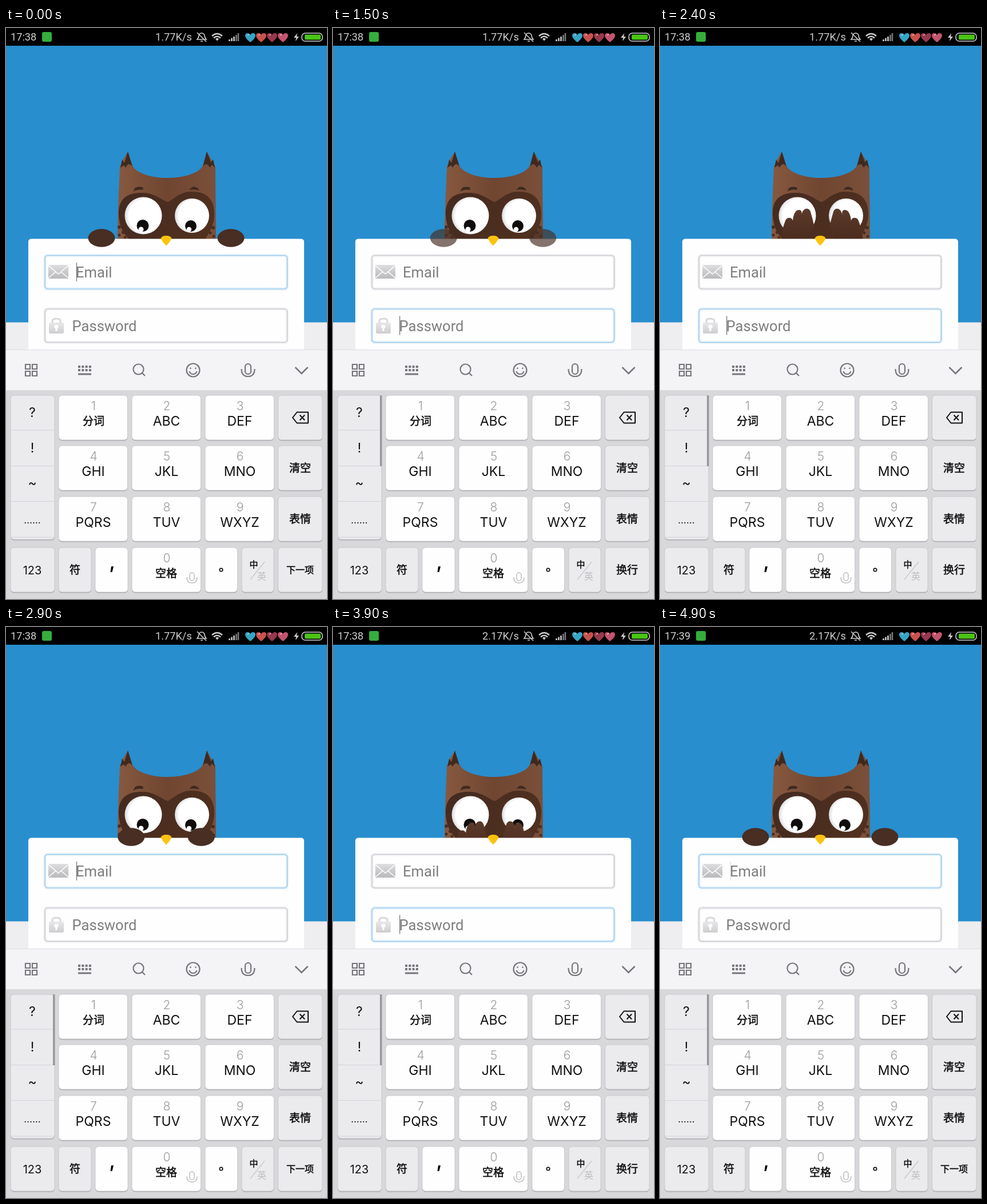
Write an HTML page that moves like this. It is 561x998 px and loops after 5000 ms.

```html
<!DOCTYPE html>
<html lang="en">
<head>
<meta charset="utf-8">
<title>Owl login</title>
<style>
  html, body { margin: 0; width: 100%; height: 100%; overflow: hidden; background: #000; }
  svg { display: block; width: 561px; height: 998px; }
  text { font-family: Inter, "Noto Sans CJK SC", "Noto Sans CJK", sans-serif; }
  .ui { font-family: Roboto, sans-serif; }
  .mid { text-anchor: middle; }
  .han { stroke: #111; stroke-width: .5; }
  .line { fill: none; stroke: #76767a; stroke-width: 2.2; }
</style>
</head>
<body>
<svg viewBox="0 0 561 998">
  <defs>
    <linearGradient id="fur">
      <stop offset="0" stop-color="#87593f"/>
      <stop offset=".5" stop-color="#704631"/>
      <stop offset="1" stop-color="#7b503a"/>
    </linearGradient>
    <linearGradient id="mask" x2="1" y2=".3">
      <stop offset="0" stop-color="#432a20"/>
      <stop offset="1" stop-color="#50301f"/>
    </linearGradient>
    <linearGradient id="wing" x2="0" y2="1">
      <stop offset="0" stop-color="#5b3a2a"/>
      <stop offset=".5" stop-color="#48291d"/>
    </linearGradient>
    <linearGradient id="grey" x2="0" y2="1">
      <stop offset="0" stop-color="#dedee0"/>
      <stop offset="1" stop-color="#b9b9bc"/>
    </linearGradient>
    <radialGradient id="eye" cx=".56" cy=".5" r=".56">
      <stop offset=".8" stop-color="#fff"/>
      <stop offset="1" stop-color="#d9d9dd"/>
    </radialGradient>
    <path id="arm" fill="url(#wing)" d="M211 440V372C212 358 216 345 219 337C221 330 231 330 232 337C233 325 237 318 243 318C247 318 248 321 247.500 326C250 314 260 313 263 321C266 332 269 342 270 350L262 356V440Z"/>
    <path id="heart" d="M0 8C-5 4-9 0-9-4C-9-9-2-9 0-5C2-9 9-9 9-4C9 0 5 4 0 8Z"/>
  </defs>

  <rect width="561" height="998" fill="#eeedef"/>
  <rect y="31" width="561" height="483.500" fill="#288ece"/>

  <!-- status bar -->
  <rect width="561" height="31"/>
  <g font-size="18.200" fill="#cfcfcf">
    <text id="clock" class="ui" x="8" y="22"></text>
    <text id="speed" class="ui" x="261" y="22"></text>
  </g>
  <rect x="63" y="7" width="17" height="17" rx="3" fill="#35ae3c"/>
  <g fill="none" stroke="#cbcbcb" stroke-width="1.6">
    <path d="M334 20Q337 17 337 13Q338 9 342 9Q346 9 347 13Q347 17 350 20ZM340 23H344M334 8L350 24"/>
    <path stroke-width="2.4" d="M360 14Q369 6 378 14M363 17.5Q369 12 375 17.5"/>
    <path stroke-width="2.6" d="M390.5 23V20M394.5 23V17.5M398.500 23V15"/>
    <path stroke="#777" stroke-width="2.6" d="M402.500 23V12M406 23V9"/>
    <rect x="517" y="9" width="36" height="14" rx="6"/>
  </g>
  <path fill="#cbcbcb" d="M366 19Q369 16.500 372 19L369 22.500ZM509 9L503 17H507L506 23L512 15H508Z"/>
  <rect x="522" y="11.500" width="28" height="9" rx="2" fill="#49c512"/>
  <use href="#heart" x="427" y="17" fill="#36a5c6"/>
  <use href="#heart" x="446" y="17" fill="#c8524d"/>
  <use href="#heart" x="465" y="17" fill="#96394f"/>
  <use href="#heart" x="484" y="17" fill="#c3546f"/>
  <path fill="none" stroke="#e9c3c8" stroke-width="1.5" d="M422 13L425 11M441 13L444 11M460 13L463 11M479 13L482 11"/>

  <!-- owl -->
  <path fill="url(#fur)" d="M195 372C195 325 197 290 199 243L204 231L213 216L221 241C238 269 327 269 344 241L351 216L360 232L366 243C366 285 367 330 367 372Z"/>
  <path fill="#3f291f" d="M200 244L203 230L207 236L213 216L221 242Q214 233 209 244L206 240ZM344 242L351 216L358 235L362 230L365 244L360 239L356 244Q351 233 344 242Z"/>
  <path fill="url(#mask)" d="M197 328C195 296 215 287 240 288C262 289 275 303 283 304C292 300 305 285 325 286C352 286 364 300 364 325C364 348 353 359 347 372H218C204 360 198 345 197 328Z"/>
  <path fill="#3f291f" d="M222 286L226 279Q233 276 240 279L239 283Q230 281 222 286ZM320 283L325 278Q334 276 338 284Q329 281 320 283Z"/>
  <g fill="#4a2e22">
    <circle cx="198" cy="348" r="3"/><circle cx="205" cy="357" r="3"/>
    <circle cx="198" cy="362" r="2.500"/><circle cx="208" cy="366" r="2.500"/>
    <circle cx="362" cy="349" r="3"/><circle cx="357" cy="358" r="2.500"/><circle cx="363" cy="364" r="2.500"/>
  </g>
  <circle cx="240" cy="328" r="32.500" fill="url(#eye)"/>
  <circle cx="325" cy="328" r="30" fill="url(#eye)"/>
  <circle cx="239" cy="345.500" r="10.500" fill="#100c0c"/>
  <circle cx="323" cy="346" r="10" fill="#100c0c"/>
  <circle cx="236" cy="352" r="4.500" fill="#fff"/>
  <circle cx="320" cy="352" r="4.200" fill="#fff"/>
  <g id="arms">
    <use href="#arm"/>
    <use href="#arm" transform="matrix(-1 0 0 1 566 0)"/>
  </g>

  <!-- form -->
  <rect x="39" y="368.500" width="482" height="220" rx="5" fill="#fefefe"/>
  <ellipse id="leftHand" cx="167" cy="367" rx="23.500" ry="15.700" fill="#482e23"/>
  <ellipse id="rightHand" cx="393" cy="367" rx="23.500" ry="15.700" fill="#482e23"/>
  <path fill="#fdc20d" d="M270.500 368Q272 363 280 363Q288 363 289.500 368Q286 375 280 380.500Q274 375 270.500 368Z"/>
  <g id="fields"></g>
  <rect x="74" y="414" width="35" height="24" fill="url(#grey)"/>
  <path fill="none" stroke="#fff" stroke-width="1.600" d="M74 415L91.500 430L109 415M74 437L87 426M109 437L96 426"/>
  <path fill="none" stroke="#d9d9db" stroke-width="3" d="M81 516V512Q81 508 88 508Q95 508 95 512V516"/>
  <rect x="75" y="515" width="26" height="19" rx="2" fill="url(#grey)" opacity=".7"/>
  <path fill="#fff" d="M88 519A3 3 0 0 1 89.500 525V530H86.500V525A3 3 0 0 1 88 519Z"/>
  <g font-size="25.600" fill="#7e7e7e">
    <text class="ui" x="122" y="436">Email</text>
    <text class="ui" x="115.500" y="530">Password</text>
  </g>
  <rect id="caret" width="1.300" height="33" fill="#777"/>

  <!-- keyboard -->
  <rect y="562" width="561" height="72" fill="#f4f3f6"/>
  <path stroke="#dddce0" d="M0 562.500H561"/>
  <rect y="633" width="561" height="365" fill="#d8d7da"/>
  <g class="line">
    <path d="M34 588H42V596H34ZM46 588H54V596H46ZM34 600H42V608H34ZM46 600H54V608H46Z"/>
    <path stroke-width="4" stroke-dasharray="4 2.300" d="M126 592H149M126 598H149"/>
    <path stroke-width="3" d="M126 605H149"/>
    <circle cx="231.500" cy="596.500" r="9"/><path d="M238 603L243 608"/>
    <circle cx="327" cy="598" r="11.500"/>
    <path d="M320.500 600Q322 605 327 605Q332 605 333.500 600M322.500 593.500V596M331.500 593.500V596"/>
    <rect x="418" y="587" width="10" height="18" rx="5"/>
    <path d="M411.500 596Q411.500 609 423 609Q434.500 609 434.500 596"/>
    <path stroke-width="2.600" d="M505.500 593L516.500 604L527.500 593"/>
  </g>
  <g id="keys"></g>
  <path stroke="#d3d2d6" d="M8 703H85M8 765.500H85M8 827.500H85M8 890H85"/>
  <rect id="scroll" x="82" y="642" width="3.500" height="124" rx="1" fill="#99989c"/>
  <path fill="none" stroke="#111" stroke-width="2" stroke-linejoin="round" d="M501 681L508.500 671.500H528V690.500H508.500ZM513.500 676.500L522 685.500M522 676.500L513.500 685.500"/>
  <path d="M184 941H188L185.500 951H182.500Z"/>
  <circle cx="376" cy="947" r="2.700" fill="none" stroke="#111" stroke-width="1.700"/>
  <path stroke="#c8c7ca" stroke-width="1.300" d="M427 964L452 933"/>
  <g fill="none" stroke="#bdbdc0" stroke-width="1.500">
    <rect x="321" y="952" width="8" height="14" rx="4"/>
    <path d="M316 960Q316 970 325 970Q334 970 334 960"/>
  </g>
</svg>
<script>
const $ = id => document.getElementById(id);
const LOOP = 5000, SLIDE = 78;
const clamp = v => Math.min(1, Math.max(0, v));

// Last [time, value] step reached.
const last = (steps, t) => steps.filter(s => s[0] <= t).pop();

const focusSteps = [[-2000, 'email'], [1400, 'password'], [2700, 'email'], [3600, 'password'], [4300, 'email']];
const caretSteps = [[0, 1], [100, 0], [600, 1], [1100, 0], [1400, 1], [1900, 0], [2400, 1],
  [3200, 0], [3600, 1], [4100, 0], [4300, 1], [4900, .25]];
const enterSteps = [[0, '下一项'], [1450, '换行'], [2850, '下一项'], [3700, '换行'], [4500, '下一项']];

const label = (x, y, size, text, fill = '#111', weight = 400) =>
  `<text class="mid" x="${x}" y="${y}" font-size="${size}" font-weight="${weight}" fill="${fill}">${text}</text>`;

const han = (x, y, text, size = 19, id = '') =>
  `<text class="mid han" id="${id}" x="${x}" y="${y}" font-size="${size}" fill="#111">${text}</text>`;

const key = (x, y, w, h, fill) =>
  `<rect x="${x}" y="${y + 1.5}" width="${w}" height="${h}" rx="6" fill="#aaa9ad"/>` +
  `<rect x="${x}" y="${y}" width="${w}" height="${h}" rx="6" fill="${fill}" stroke="#c3c2c6" stroke-width=".8"/>`;

function buildKeys() {
  const white = '#fefefe', pale = '#ebeaed', rows = [642, 730, 819, 908];
  const names = ['分词', 'ABC', 'DEF', 'GHI', 'JKL', 'MNO', 'PQRS', 'TUV', 'WXYZ'];
  let out = key(8, 642, 77, 252, pale);
  ['?', '!', '~', '……'].forEach((s, i) => out += label(46, [680, 742, 803, 866][i], i < 3 ? 23 : 17, s));
  names.forEach((name, i) => {
    const x = 92 + i % 3 * 128, y = rows[i / 3 | 0];
    out += key(x, y, 120.5, 78, white) + label(x + 61, y + 26, 21, i + 1, '#9b9b9e', 300) +
      (i ? label(x + 60.5, y + 53, 23, name) : han(x + 61, y + 52, name));
  });
  rows.forEach(y => out += key(475.5, y, 77.5, 78, pale));
  [[8, 77, pale], [92, 57, pale], [156, 57, white], [220, 120.5, white], [348, 56.5, white], [412, 56, pale]]
    .forEach(([x, w, fill]) => out += key(x, 908, w, 78, fill));
  out += label(46, 955, 20, '123') + han(120.5, 954, '符') +
    label(281, 934, 21, 0, '#9b9b9e', 300) + han(280, 960, '空格') +
    han(433, 943, '中', 15) + label(447, 964, 16, '英', '#bdbdc0') +
    han(514, 776, '清空') + han(514, 865, '表情') + han(514, 954, '', 19, 'enter');
  $('keys').innerHTML = out;
}

function buildFields() {
  $('fields').innerHTML = [['email', 397.5], ['password', 491]].map(([id, y]) =>
    `<g id="${id}" fill="none">` + [[6, .12], [3.5, .25], [1.1, .9]].map(([w, o]) =>
      `<rect x="68" y="${y}" width="423.500" height="58.500" rx="5" stroke-width="${w}" stroke-opacity="${o}"/>`).join('') +
    '</g>').join('');
}

function draw(t) {
  const [since, focus] = last(focusSteps, t);
  const age = t - since, covering = focus === 'password';

  // Hands slide behind the wings; the wings rise over the eyes.
  const slide = covering ? clamp(age / 300) : 1 - clamp((age - 100) / 300);
  const rise = covering ? clamp((age - 150) / 250) : 1 - clamp((age - 130) / 70);
  $('arms').setAttribute('transform', `translate(0 ${60 * (1 - rise)})`);
  for (const [id, side] of [['leftHand', 1], ['rightHand', -1]]) {
    $(id).setAttribute('transform', `translate(${side * SLIDE * slide} 0)`);
    $(id).setAttribute('opacity', covering ? 1 - slide : +(age > 150));
  }

  for (const id of ['email', 'password'])
    $(id).setAttribute('stroke', id === focus ? '#8fc3e9' : '#c4c3ca');
  $('caret').setAttribute('x', covering ? 116 : 122.8);
  $('caret').setAttribute('y', covering ? 503.5 : 410);
  $('caret').setAttribute('opacity', last(caretSteps, t)[1]);

  const enter = last(enterSteps, t)[1];
  $('enter').textContent = enter;
  $('enter').setAttribute('font-size', enter.length > 2 ? 16 : 19);
  $('enter').setAttribute('y', enter.length > 2 ? 953 : 954);
  $('scroll').setAttribute('opacity', +(t >= 1450));
  $('clock').textContent = t < 4000 ? '17:38' : '17:39';
  $('speed').textContent = t < 3100 ? '1.77K/s' : '2.17K/s';
}

buildKeys();
buildFields();
const start = performance.now();
function tick() {
  draw((performance.now() - start) % LOOP);
  requestAnimationFrame(tick);
}
tick();
</script>
</body>
</html>
```
